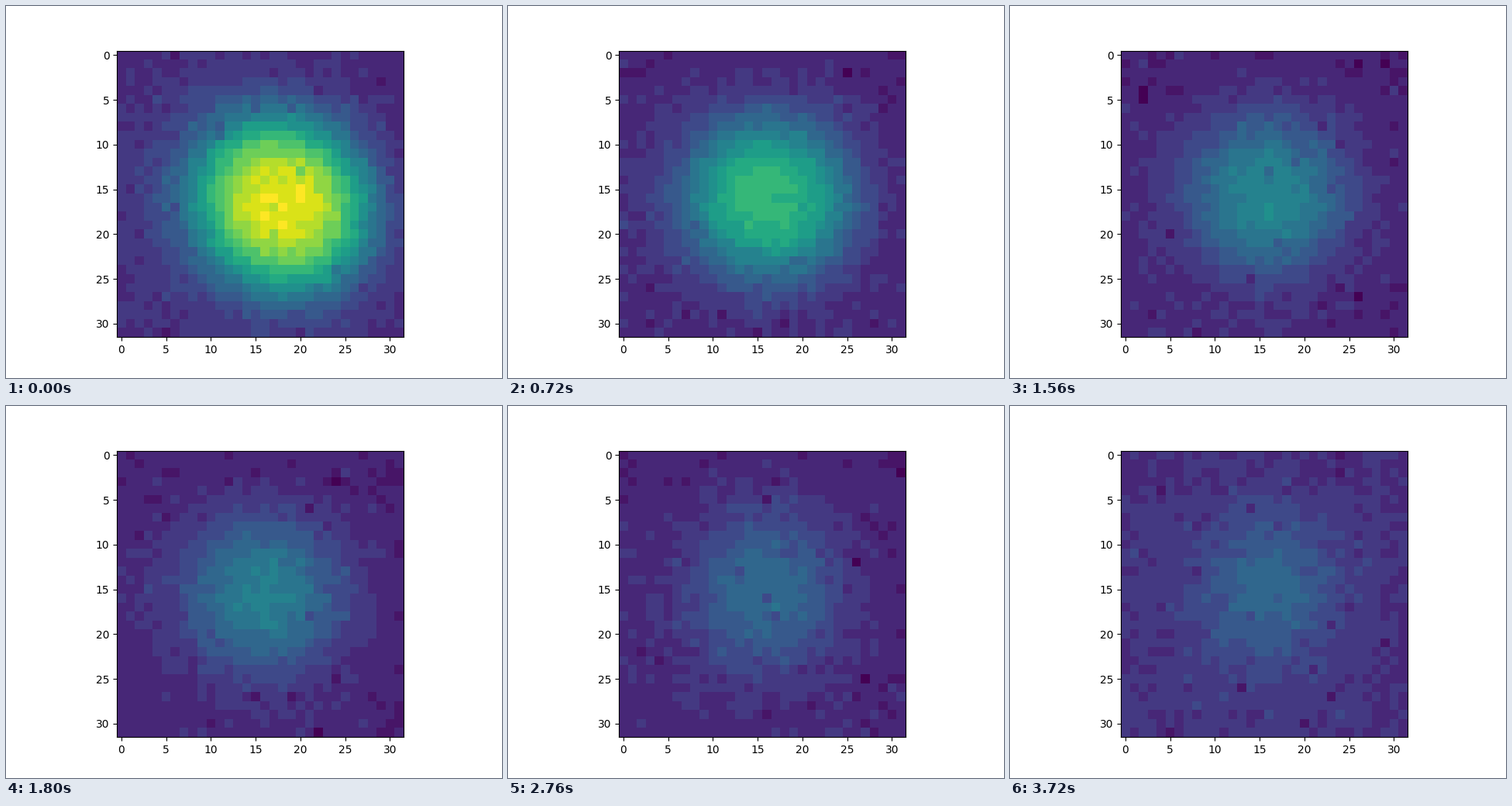
These frames come from a looping animation (640x480 px, 3840 ms). A matplotlib script:

```python
import numpy as np
import matplotlib.pyplot as plt
from matplotlib.animation import FuncAnimation

FRAMES, INTERVAL = 32, 120
SIZE, LEVELS = 32, 18

rows, cols = np.mgrid[:SIZE, :SIZE]


def spot_core(step, settle):
    """Flat-topped spot that shrinks and drifts towards the middle."""
    center_x = 15.9 + 2.1 * settle
    center_y = 15.1 + 1.5 * np.exp(-step / 12)
    dx = (cols - center_x) / (8.5 - 0.075 * step)
    dy = (rows - center_y) / (7.4 + 1.1 * np.exp(-step / 5))
    # The spot starts slightly stretched along the diagonal
    radius = np.sqrt(dx**2 + dy**2 - 0.18 * settle * dx * dy)
    return 0.5 ** (radius ** (2.9 - 0.022 * step))


def spot_image(step):
    rng = np.random.default_rng(100 + step)
    fade = np.exp(-((step / 9) ** 1.2))
    settle = np.exp(-step / 3.5)

    peak = 0.32 + 0.645 * fade
    base = 0.108 + 0.017 * settle + 0.036 * np.exp((step - FRAMES + 1) / 2.5)
    core = spot_core(step, settle)
    halo = np.exp(-((cols - 13) ** 2 + (rows - 16) ** 2) / 170)
    image = base + (peak - base) * core
    image += (0.02 + 0.08 * fade) * halo * (1 - core)

    # Dim right and top edges
    image -= 0.012 * (cols > 28) + 0.012 * (rows < 5)

    image += rng.normal(0, 0.018, image.shape)
    image -= 0.08 * (rng.random(image.shape) < 0.018)
    return np.round(np.clip(image, 0, 1) * LEVELS) / LEVELS


fig, ax = plt.subplots(figsize=(6.4, 4.8), dpi=100)
picture = ax.imshow(spot_image(0), cmap="viridis", vmin=0, vmax=1)


def update(step):
    picture.set_data(spot_image(step))
    return [picture]


anim = FuncAnimation(fig, update, frames=FRAMES, interval=INTERVAL,
                     repeat=True, repeat_delay=0)
plt.show()
```
